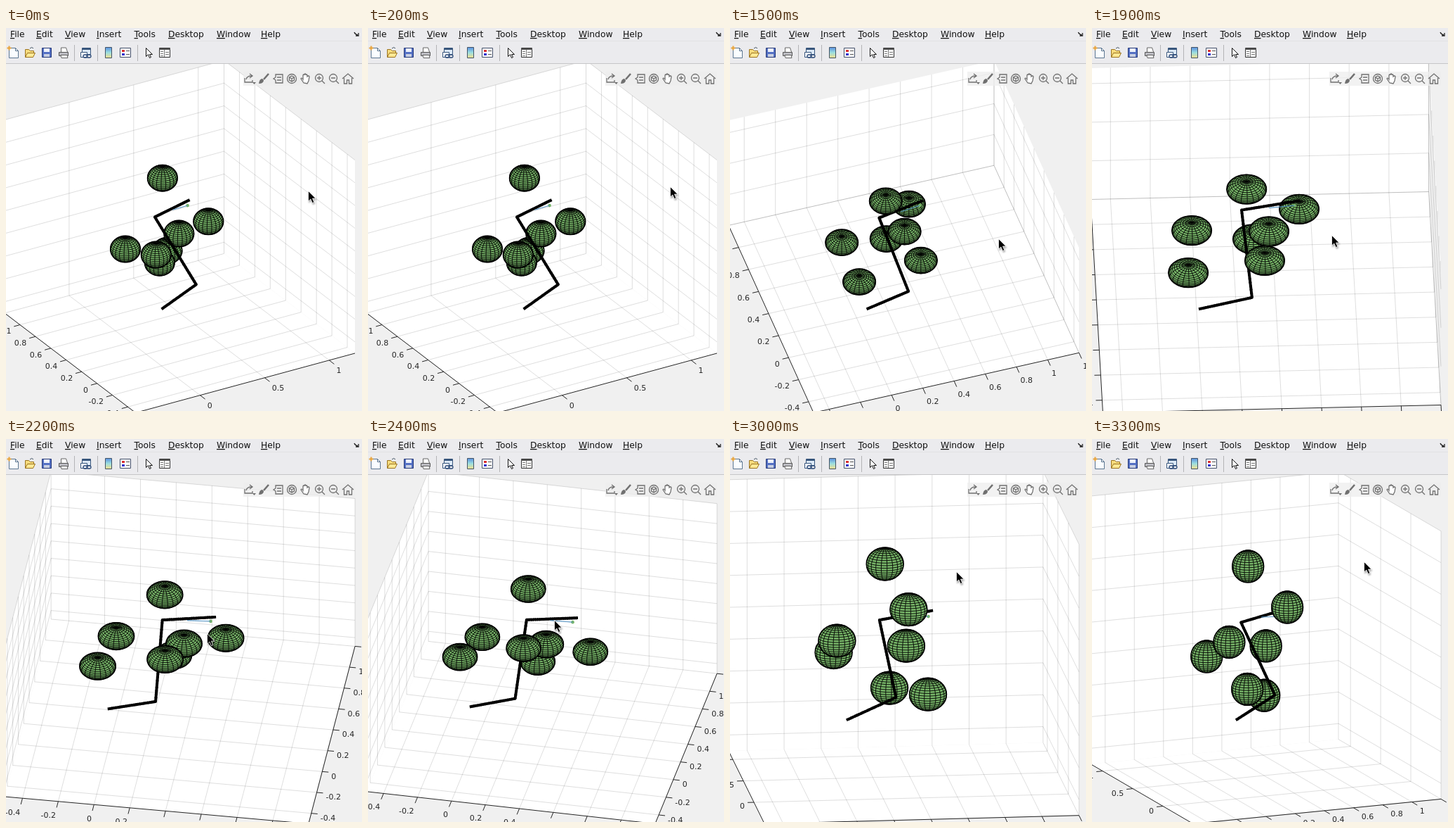
Recreate the animation shown at these times as an HTML page with a canvas. Size 507x544 px, loop 3400 ms.

```html
<!DOCTYPE html>
<html>
<head>
<meta charset="utf-8">
<style>
html, body { margin: 0; width: 100%; height: 100%; overflow: hidden; background: #f0f0f0; }
canvas, svg { position: absolute; left: 0; top: 0; }
text { font: 12.3px "DejaVu Sans", sans-serif; fill: #111; }
tspan { text-decoration: underline; }
#cursor { filter: drop-shadow(1px 2px 1px rgba(0, 0, 0, .35)); }
</style>
</head>
<body>
<canvas id="plot" width="507" height="544"></canvas>
<svg width="507" height="544" fill="none">
  <rect width="507" height="51" fill="#ebebee"/>
  <path d="M0 18.500H507" stroke="#e2e2e4"/>
  <path d="M0 50.500H507" stroke="#c6c6c8"/>
  <text x="6" y="13"><tspan>F</tspan>ile</text>
  <text x="43" y="13"><tspan>E</tspan>dit</text>
  <text x="84" y="13"><tspan>V</tspan>iew</text>
  <text x="129" y="13"><tspan>I</tspan>nsert</text>
  <text x="182.500" y="13"><tspan>T</tspan>ools</text>
  <text x="231" y="13"><tspan>D</tspan>esktop</text>
  <text x="300" y="13"><tspan>W</tspan>indow</text>
  <text x="363" y="13"><tspan>H</tspan>elp</text>
  <path d="M496 6q1 3 5 4M502 7v4h-4" stroke="#222" stroke-width="1.3"/>
  <path d="M97.500 24V47M130.500 24V47M187.500 24V47" stroke="#b4b4b6"/>

  <!-- figure toolbar -->
  <g stroke-linejoin="round">
    <path d="M4.500 28.500h9l4 4v10h-13z" fill="#fafdff" stroke="#5b7590"/>
    <path d="M13.500 28.500v4h4" stroke="#5b7590"/>
    <path d="M4.500 25.500v6M1.500 28.500h6" stroke="#e8a33a" stroke-width="2"/>
    <path d="M27.500 41.500v-11h5l2 2h5v4" fill="#f7dc7e" stroke="#9a7320"/>
    <path d="M27.500 41.500l3-6h11l-3 6z" fill="#ffe894" stroke="#9a7320"/>
    <path d="M34 29q3-3 5 0" stroke="#456"/>
    <path d="M51.500 28.500h13v13h-13z" fill="#5470c4" stroke="#273a78"/>
    <path d="M54 29h8v5h-8z" fill="#eef2fb"/>
    <path d="M54 37h8v4h-8z" fill="#c9d0e2"/>
    <path d="M78.500 34v-6h7l2 6" fill="#fff" stroke="#666"/>
    <path d="M75.500 34.500h13v5h-13z" fill="#bcbcc2" stroke="#555"/>
    <path d="M78 38.500h9l1 4h-9z" fill="#fff" stroke="#666"/>
    <path d="M108.500 28.500h12v9h-12z" fill="#dce9f7" stroke="#38567c"/>
    <path d="M108 30h13" stroke="#38567c" stroke-width="2"/>
    <path d="M106.500 34.500h9v7h-9z" fill="#f4f8fd" stroke="#38567c"/>
    <rect x="110" y="38" width="6" height="4" rx="2" stroke="#2c4a78" stroke-width="1.300"/>
    <rect x="115" y="38" width="6" height="4" rx="2" stroke="#2c4a78" stroke-width="1.300"/>
    <path d="M141.500 27.500h9v15h-9z" fill="url(#bar)" stroke="#456"/>
    <path d="M162.500 28.500h15v13h-15z" fill="#fff" stroke="#44506a"/>
    <path d="M165 31h4v3h-4z" fill="#d33"/><path d="M165 36h4v3h-4z" fill="#33c"/>
    <path d="M171 32.500h5M171 37.500h5" stroke="#555"/>
    <path d="M199.500 28.500v12l3-3 2 5 2-1-2-4h4z" fill="#fff" stroke="#111"/>
    <path d="M218.500 28.500h15v13h-15z" fill="#fff" stroke="#333"/>
    <path d="M218 30h16" stroke="#555" stroke-width="2"/>
    <path d="M225.500 31v10M227 34.500h5M227 37.500h5M220 33.500h4M220 36.500h4M220 39.500h4" stroke="#777"/>
  </g>
  <linearGradient id="bar" x2="0" y2="1">
    <stop stop-color="#5b8fe0"/><stop offset=".5" stop-color="#9ce0e0"/><stop offset="1" stop-color="#f3df8c"/>
  </linearGradient>

  <!-- axes toolbar -->
  <rect x="338" y="62" width="159" height="20" fill="#eee" fill-opacity=".75"/>
  <g stroke="#707070" stroke-width="1.300">
    <path d="M340 71v6h11v-3M342 73q1-5 8-5M347 65l4 3-4 3"/>
    <path d="M351 77h5l-2.500 3z" fill="#707070" stroke="none"/>
    <path d="M374 65l-7 8" stroke-width="2.500"/>
    <path d="M360 79q1-7 5-7l2 2q0 5-7 5z" fill="#707070" stroke="none"/>
    <path d="M384 66h10v12h-10v-4l-3-2 3-2zM386 70h6M386 74h6"/>
    <circle cx="407" cy="72" r="6.500"/>
    <path d="M407 68l3.500 2v4l-3.500 2-3.500-2v-4zM403.500 70l3.500 2 3.500-2M407 72v4"/>
    <path d="M424 78l-4-6q1-2 3 1v-6q1-2 2 0v-1q1-2 2 0v1q1-2 2 0v2q2-2 3 0l-1 6-2 4z" fill="#fff"/>
    <circle cx="446" cy="71" r="5.500"/><path d="M450 75l4 4M443 71h6M446 68v6"/>
    <circle cx="466" cy="71" r="5.500"/><path d="M470 75l4 4M463 71h6"/>
    <path d="M479 72l8-7 8 7M481.500 71v8h4v-5h3v5h4v-8"/>
  </g>
  <path id="cursor" d="M0 0V14.500L3.300 11.500L5.800 17L8.300 16L6 10.600H10.500Z" fill="#000" stroke="#fff" stroke-width=".8"/>
</svg>
<script>
const g = document.getElementById('plot').getContext('2d');
const cursor = document.getElementById('cursor');

// Coordinates are relative to the middle of the cubic axes, which run from -0.5 to 1.2.
const MID = 0.35, HALF = 0.85, RADIUS = 0.1;
const BOX = { cx: 247.5, cy: 296.25, w: 499, h: 500.5 };
const INK = '#262626', GRID = 'rgba(38,38,38,.15)';

// time, azimuth, elevation, cursor x, cursor y
const KEYS = [
  [1000, -27.43, 41.2, 420, 246],
  [1500, -17.75, 61.9, 383, 300],
  [1900, -2.08, 58.4, 342, 295],
  [2400, 12.1, 42.1, 266, 258],
  [2700, 6.35, 17.55, 277, 207],
  [3300, -22.47, 13.56, 388, 175]
];
const BALLS = [
  [-.094, .067, .509], [.0175, .04, 0], [-.02, -.405, .348], [.185, .474, -.426],
  [-.059, .163, -.295], [-.369, .088, -.042], [-.403, -.368, .154]
];
const ARM = [[-.35, -.35, -.35], [-.082, -.35, -.216], [-.117, .128, .142], [.177, .168, .182]];
const TARGET = [.15, .15, .15], POINTER = [.021, .127, .163];

const mix = (a, b, k) => a.map((v, i) => v + (b[i] - v) * k);

// Monotone cubic through column c of KEYS
function curve(c, t) {
  const last = KEYS.length - 2;
  let i = 0;
  while (i < last && t >= KEYS[i + 1][0]) i++;
  const slope = n => {
    const k = Math.max(0, Math.min(last, n));
    return (KEYS[k + 1][c] - KEYS[k][c]) / (KEYS[k + 1][0] - KEYS[k][0]);
  };
  const tangent = n => {
    const a = slope(n - 1), b = slope(n);
    return a * b > 0 ? 2 * a * b / (a + b) : 0;
  };
  const h = KEYS[i + 1][0] - KEYS[i][0], u = (t - KEYS[i][0]) / h, v = 1 - u;
  return KEYS[i][c] * (1 + 2 * u) * v * v + KEYS[i + 1][c] * u * u * (3 - 2 * u)
    + h * u * v * (v * tangent(i) - u * tangent(i + 1));
}

function pose(t) {
  if (t < 1000) return [-30.83, 31, 431, t < 100 ? 232 : t < 200 ? 229 : 226];
  return [1, 2, 3, 4].map(c => curve(c, t));
}

// Orthographic view stretched to fill the axes rectangle
function makeView(azDeg, elDeg) {
  const az = azDeg * Math.PI / 180, el = elDeg * Math.PI / 180;
  const c = Math.cos(az), s = Math.sin(az), ce = Math.cos(el), se = Math.sin(el);
  const spread = Math.abs(c) + Math.abs(s);
  const kx = BOX.w / (2 * HALF * spread), ky = BOX.h / (2 * HALF * (se * spread + ce));
  return {
    kx, ky, az,
    width: 2 * HALF * kx * c, depth: 2 * HALF * ky * se * c, height: 2 * HALF * ky * ce,
    at: ([x, y, z]) => [BOX.cx + kx * (c * x + s * y), BOX.cy - ky * (se * (c * y - s * x) + ce * z)],
    near: ([x, y, z]) => ce * (s * x - c * y) + se * z
  };
}

function trace(view, points) {
  points.forEach((p, i) => g[i ? 'lineTo' : 'moveTo'](...view.at(p)));
}

function stroke(view, points, color, width) {
  g.beginPath();
  trace(view, points);
  g.strokeStyle = color;
  g.lineWidth = width;
  g.stroke();
}

function ticks(step) {
  const list = [];
  for (let i = Math.ceil(-.5 / step); i * step < 1.21; i++) list.push(+(i * step).toFixed(1));
  return list;
}

function drawAxes(view, early) {
  const H = HALF, side = view.az < 0 ? H : -H;
  const floor = (x, y) => [x, y, -H];
  const faces = [
    [[-H, -H, -H], [H, -H, -H], [H, H, -H], [-H, H, -H]],
    [[-H, H, -H], [H, H, -H], [H, H, H], [-H, H, H]],
    [[side, -H, -H], [side, H, -H], [side, H, H], [side, -H, H]]
  ];
  g.fillStyle = '#fff';
  for (const f of faces) {
    g.beginPath();
    trace(view, f);
    g.fill();
  }
  const xs = ticks(view.width > 343 ? .2 : .5);
  const ys = ticks(early || view.depth > 195 ? .2 : .5);
  const zs = ticks(view.height > 207 ? .2 : .5);
  for (const v of xs) {
    const x = v - MID;
    stroke(view, [[x, -H, -H], [x, H, -H], [x, H, H]], GRID, 1);
  }
  for (const v of ys) {
    const y = v - MID;
    stroke(view, [[-side, y, -H], [side, y, -H], [side, y, H]], GRID, 1);
  }
  for (const v of zs) {
    const z = v - MID;
    stroke(view, [[-side, H, z], [side, H, z], [side, -H, z]], GRID, 1);
  }
  stroke(view, [floor(-H, -H), floor(H, -H)], INK, 1);
  stroke(view, [floor(-side, -H), floor(-side, H)], INK, 1);
  for (const v of xs) drawTick(view, floor(v - MID, -H), [0, -1, 0], v);
  for (const v of ys) drawTick(view, floor(-side, v - MID), [-Math.sign(side), 0, 0], v);
}

function drawTick(view, p, out, label) {
  const [x, y] = view.at(p);
  const [ex, ey] = view.at(p.map((v, i) => v + out[i]));
  const len = Math.hypot(ex - x, ey - y), dx = (ex - x) / len, dy = (ey - y) / len;
  g.beginPath();
  g.moveTo(x, y);
  g.lineTo(x + 9 * dx, y + 9 * dy);
  g.strokeStyle = INK;
  g.lineWidth = 1;
  g.stroke();
  g.font = '11px "DejaVu Sans", sans-serif';
  g.fillStyle = INK;
  g.textAlign = dx > 0 ? 'left' : 'right';
  g.fillText(label, x + 13 * dx, y + 15 * dy + 9);
}

function drawBall(view, center) {
  const N = 20;
  const dir = (i, j) => {
    const lat = Math.PI * (i / N - .5), lon = 2 * Math.PI * j / N;
    return [Math.cos(lat) * Math.cos(lon), Math.cos(lat) * Math.sin(lon), Math.sin(lat)];
  };
  const put = d => view.at(center.map((v, k) => v + RADIUS * d[k]));
  g.beginPath();
  g.ellipse(...view.at(center), RADIUS * view.kx, RADIUS * view.ky, 0, 0, 7);
  g.fillStyle = '#77b568';
  g.fill();
  g.strokeStyle = '#000';
  g.lineWidth = 1.4;
  g.stroke();
  g.beginPath();
  for (let i = 0; i < N; i++) for (let j = 0; j < N; j++) {
    const a = dir(i, j);
    for (const b of [dir(i + 1, j), dir(i, j + 1)]) {
      if (view.near(a) + view.near(b) < 0) continue;
      g.moveTo(...put(a));
      g.lineTo(...put(b));
    }
  }
  g.lineWidth = .9;
  g.stroke();
}

function dot(view, p, r, color) {
  g.beginPath();
  g.arc(...view.at(p), r, 0, 7);
  g.fillStyle = color;
  g.fill();
}

function drawScene(view) {
  const items = [];
  const add = (p, draw) => items.push([view.near(p), draw]);
  const rod = (a, b, color, width) => {
    const n = 24;
    for (let i = 0; i < n; i++) {
      const ends = [mix(a, b, i / n), mix(a, b, Math.min(1, (i + 1.3) / n))];
      add(mix(a, b, (i + .5) / n), () => stroke(view, ends, color, width));
    }
  };
  for (const c of BALLS) add(c, () => drawBall(view, c));
  for (let i = 0; i < 3; i++) rod(ARM[i], ARM[i + 1], '#000', 4);
  for (const p of ARM.slice(1, 3)) add(p, () => dot(view, p, 2, '#000'));
  rod(POINTER, TARGET, '#4f8fc0', 1);
  add(TARGET, () => dot(view, TARGET, 2.3, '#77b568'));
  items.sort((a, b) => a[0] - b[0]).forEach(item => item[1]());
}

let shown = -1;
function tick(now) {
  const t = Math.floor(now % 3400 / 100) * 100;
  if (t !== shown) {
    shown = t;
    const [az, el, x, y] = pose(t), view = makeView(az, el);
    g.fillStyle = '#f0f0f0';
    g.fillRect(0, 0, 507, 544);
    drawAxes(view, t < 1000);
    drawScene(view);
    cursor.setAttribute('transform', `translate(${Math.round(x) - .5} ${Math.round(y) - .5})`);
  }
  requestAnimationFrame(tick);
}
tick(performance.now());
</script>
</body>
</html>
```
